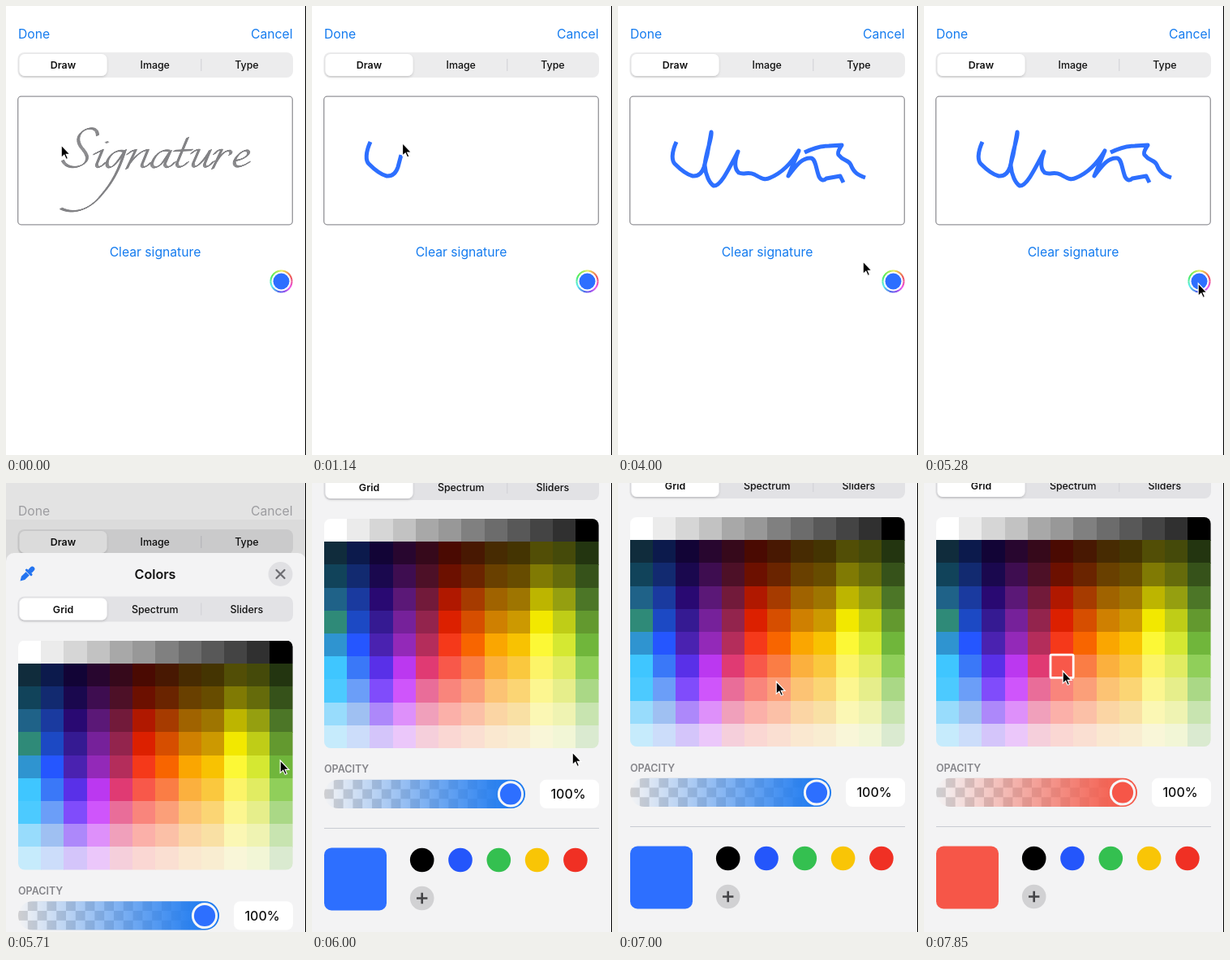
Animation, 370 px wide and 552 px high, one loop 8000 ms. Source, as an HTML page:

```html
<!DOCTYPE html>
<html lang="en">
<head>
<meta charset="utf-8">
<title>Signature pad</title>
<style>
html, body { margin: 0; width: 100%; height: 100%; overflow: hidden; background: #fff; }
svg { display: block; width: 370px; height: 552px; --c: #2d6fff; --track: #1f7bf0; }
svg.red { --c: #f65648; --track: #f45c4c; }
text { font-family: Inter, Roboto, sans-serif; fill: #111; }
.link { font-size: 15.7px; fill: #147bef; }
.dimmed .link { fill: #b0b0b4; }
.seg { font-size: 12.4px; font-weight: 500; text-anchor: middle; }
.on { font-weight: 600; }
.title { font-size: 16.1px; font-weight: 600; text-anchor: middle; }
.cap { font-size: 12.5px; font-weight: 600; fill: #85858a; }
.pct { font-size: 16px; font-weight: 500; text-anchor: middle; }
.ink { fill: none; stroke: #2d6fff; stroke-width: 5; stroke-linejoin: round; }
.tint { fill: var(--c); }
stop { stop-color: var(--track); }
</style>
</head>
<body>
<svg id="stage" viewBox="0 0 370 552">
  <defs>
    <pattern id="check" x="15" y="428.2" width="23.6" height="23.6" patternUnits="userSpaceOnUse">
      <rect width="23.6" height="23.6" fill="#f3f3f4"/>
      <path d="M11.8 0h11.8v11.8H0v11.8h11.8z" fill="#cfcfd1"/>
    </pattern>
    <linearGradient id="fade">
      <stop offset="0" stop-opacity="0"/><stop offset=".5" stop-opacity=".55"/><stop offset=".92"/>
    </linearGradient>
    <clipPath id="round"><rect x="15" y="107.5" width="338.6" height="282" rx="8"/></clipPath>
    <filter id="soft" x="-10%" y="-20%" width="120%" height="150%">
      <feDropShadow dx="0" dy="1.5" stdDeviation="1.8" flood-opacity=".16"/>
    </filter>
    <path id="word" d="M113 159C113 150 105 149 98 152C88 157 87 166 93 174C100 182 103 188 96 194C88 200 74 200 70 190
      M109 182L119 177L112 194C111 201 118 198 123 192M124 167l1 1
      M146 179C138 175 128 182 125 191C123 199 128 200 133 196C139 190 143 184 147 177C140 200 132 216 118 232C104 250 84 257 68 249
      M150 182Q155 177 160 177L149 200M152 194C160 184 168 177 175 177L168 194C166 201 174 198 179 192
      M201 178C190 175 182 186 180 194C180 202 190 198 195 190L203 178L196 194C196 201 204 198 208 192
      M224 162L211 193C210 201 219 198 224 192M208 178L229 177
      M229 181Q234 176 238 177L231 193C229 203 241 196 252 177L245 194C244 201 251 197 256 191
      M257 182Q261 176 266 177L255 200M259 192C264 184 270 177 276 178Q279 180 276 183
      M282 190C290 190 301 184 299 179C297 175 286 180 282 190C280 199 288 200 300 192"/>
  </defs>

  <g id="page">
    <rect width="370" height="552" fill="#fff"/>
    <text class="link" x="15" y="40">Done</text>
    <text class="link" x="353.5" y="40" text-anchor="end">Cancel</text>
    <g id="modes"></g>
    <rect x="14.7" y="111.2" width="338.6" height="157.6" rx="4" fill="#fff" stroke="#949499" stroke-width="1.3"/>
    <g id="hint" role="img" aria-label="Signature" fill="none" stroke="#828285" stroke-linecap="round"></g>
    <path id="inkA" class="ink" d="M72 167C66 180 66 190 70 194C76 200 84 207 92 209Q102 210 106 198L110 183L115 155
      C117 160 108 180 107 196C108 208 113 218 118 221C126 222 136 202 148 179C144 190 143 200 149 205
      C156 208 160 203 168 207C176 211 180 215 188 211C200 206 212 196 223 178L210 209
      C218 199 226 186 238 187C244 188 244 200 248 210Q252 217 257 212L274 209L278 217"/>
    <path id="inkB" class="ink" d="M230 180C240 175 252 172 260 172L276 171Q270 180 272 183C278 191 284 189 287 195C291 205 296 208 305 211"/>
    <text class="link" x="184" y="308.4" text-anchor="middle">Clear signature</text>
    <g id="well" fill="none" stroke-width="2.1"></g>
    <circle cx="339.5" cy="338.5" r="10" fill="#2d6fff"/>
  </g>

  <g id="dim">
    <rect width="370" height="552" fill-opacity=".145"/>
    <rect y="45" width="370" height="507" fill-opacity=".05"/>
  </g>

  <g id="sheet">
    <rect width="370" height="760" rx="10" fill="#f3f3f4"/>
    <g transform="translate(26 26) rotate(45)" fill="#2474f0">
      <rect x="-3" y="-12" width="6" height="9" rx="3"/>
      <rect x="-5.5" y="-4.6" width="11" height="3" rx="1.5"/>
      <path d="M-3 -1V7L0 12L3 7V-1z"/>
    </g>
    <text class="title" x="184" y="32">Colors</text>
    <circle cx="338.5" cy="26" r="15" fill="#e0e0e3"/>
    <path d="M333.5 21l10 10m0-10l-10 10" stroke="#6c6c71" stroke-width="2.2" stroke-linecap="round"/>
    <g id="tabs"></g>
    <g id="grid" clip-path="url(#round)" shape-rendering="crispEdges"></g>
    <rect id="pick" x="156" y="276.7" width="28.2" height="28.2" rx="1.5" fill="none" stroke="#fff" stroke-width="2.8"/>
    <text class="cap" x="15" y="420">OPACITY</text>
    <rect x="15" y="428.2" width="248" height="35.4" rx="17.7" fill="url(#check)"/>
    <rect x="15" y="428.2" width="248" height="35.4" rx="17.7" fill="url(#fade)"/>
    <circle class="tint" cx="245" cy="446" r="14.6" stroke="#f6f6f8" stroke-width="3"/>
    <rect x="281" y="428.2" width="73" height="35.4" rx="8" fill="#fff"/>
    <text class="pct" x="316" y="451.8">100%</text>
    <path d="M15 488H354" stroke="#c8cbd2"/>
    <rect class="tint" x="15" y="512" width="77" height="77" rx="9"/>
    <g id="dots"></g>
    <circle cx="135.7" cy="574" r="14.8" fill="#d1d1d3"/>
    <path d="M129 574h13.4m-6.7-6.7v13.4" stroke="#444447" stroke-width="2.6"/>
  </g>

  <path id="arrow" d="M0 0V15.4L3.6 12.2L6 17.4L8.3 16.4L6 11.4H10.8Z" fill="#000" stroke="#fff" stroke-width="1.1"/>
  <rect x="369" width="1" height="552"/>
</svg>

<script>
const $ = id => document.getElementById(id);
const LOOP = 8000, FPS = 7;

function add(parent, tag, attrs, text) {
  const el = document.createElementNS('http://www.w3.org/2000/svg', tag);
  for (const key in attrs) el.setAttribute(key, attrs[key]);
  if (text) el.textContent = text;
  parent.append(el);
  return el;
}

function segments(parent, y, track, labels) {
  add(parent, 'rect', { x: 14.5, y, width: 339.5, height: 31, rx: 8, fill: track });
  add(parent, 'rect', { x: 16.5, y: y + 2, width: 108, height: 27, rx: 6.5, fill: '#fff', filter: 'url(#soft)' });
  add(parent, 'rect', { x: 240.3, y: y + 8, width: 1, height: 15, fill: '#cfcfd4' });
  labels.forEach((label, i) =>
    add(parent, 'text', { class: i ? 'seg' : 'seg on', x: 70.5 + i * 113.2, y: y + 20 }, label));
}
segments($('modes'), 57, '#ececed', ['Draw', 'Image', 'Type']);
segments($('tabs'), 53.5, '#e2e2e5', ['Grid', 'Spectrum', 'Sliders']);

// broad-nib lettering: shifted copies of a thin line
for (let i = -3; i <= 3; i++)
  add($('hint'), 'use', { href: '#word', transform: `translate(${i * 0.5} ${-i * 0.24})` });

for (let a = 0; a < 360; a += 10) {
  const at = d => {
    const r = d * Math.PI / 180;
    return `${339.5 + 13 * Math.sin(r)} ${338.5 - 13 * Math.cos(r)}`;
  };
  add($('well'), 'path', { d: `M${at(a)}A13 13 0 0 1 ${at(a + 10.5)}`, stroke: `hsl(${(420 - a) % 360} 80% 62%)` });
}

const palette = [
  'ffffff ebebeb d6d6d6 c2c2c2 a8a8a8 989898 808080 6c6c6c 585858 444444 303030 000000',
  '102c3c 0c1a4c 120436 28062f 36091b 4a0a02 481802 472b02 443402 524e06 454a0a 233510',
  '11435a 122a70 1a084e 3e0d50 4d1027 6c1000 6a2400 694000 674c00 807a04 656b0b 36521a',
  '1f6288 1a3a9f 290972 5b1877 721a3a b01800 a63b00 a06300 9e7501 bdb500 959f10 4c7627',
  '2f8a78 1c49c4 351a92 76219a 93244d dc2000 d64e00 cf8001 cc9901 f2e800 bfcd17 63992f',
  '2f94d0 2556ff 4a22b0 9329b8 b42d5b f5391a f86500 faa601 f8c202 fcf836 d5e832 70b63b',
  '3fc6ff 3a78f8 5930e8 bb38f0 e03a73 f8584a fa7d45 fbb03e fac83e fcf468 e1ec62 90cf5a',
  '4ccaff 6b9ef8 804cfb cf55fb e96d99 f9857c fb9f79 fcc374 fbd574 fcf690 e6ee8b aad886',
  '98dcfc 9fc0f2 ad88fa de90fa f0a0bb fbb0a9 fbc0a7 fbd5a4 f9e0a4 fbf7b4 eff3b2 c8e4b0',
  'c6ebfc ccddfa d4c5fa ebc7fa f5cfdb fad7d3 fadfd2 fae8d0 f9edd1 f9f6d8 f2f6d6 daead0'
];
const CELL = 338.6 / 12;
palette.forEach((row, j) => row.split(' ').forEach((hex, i) =>
  add($('grid'), 'rect', { x: 15 + i * CELL, y: 107.5 + j * 28.2, width: CELL + 0.3, height: 28.5, fill: '#' + hex })));

['#000', '#2456fb', '#34c050', '#f9c506', '#f03024'].forEach((fill, i) =>
  add($('dots'), 'circle', { cx: 135.7 + i * 47.3, cy: 527, r: 14.8, fill }));

// rows of [step, ...values], linear in between
function lerp(rows, k) {
  const n = rows.findIndex(row => row[0] > k);
  if (n < 0) return rows[rows.length - 1].slice(1);
  if (n === 0) return rows[0].slice(1);
  const a = rows[n - 1], b = rows[n], u = (k - a[0]) / (b[0] - a[0]);
  return a.slice(1).map((v, i) => v + (b[i + 1] - v) * u);
}

const lenA = $('inkA').getTotalLength(), lenB = $('inkB').getTotalLength();
const drawA = [[3, 0], [8, 90], [20, lenA]];
const drawB = [[21, 0], [25, lenB]];
const moves = [
  [0, 69, 172], [3, 72, 168],
  [25, 305, 211], [28, 303, 315], [29, 303, 315], [34, 339, 342], [40, 339, 342],
  [42, 322, 332], [49, 196, 245], [50, 196, 245], [53, 172, 232]
];
const LEAD = 14;

function ink(path, length) {
  path.style.strokeDasharray = `${length} 9999`;
  path.style.visibility = length > 0 ? 'visible' : 'hidden';
}

function pointer(k, a, b) {
  if (k < 3 || k >= 25) return lerp(moves, k);
  const p = k < 21 ? $('inkA').getPointAtLength(Math.min(lenA, a + LEAD))
                   : $('inkB').getPointAtLength(Math.min(lenB, b + LEAD));
  return [p.x, p.y];
}

function render(ms) {
  const k = Math.floor((ms + 5) * FPS / 1000);
  const [a] = lerp(drawA, k), [b] = lerp(drawB, k);
  ink($('inkA'), a);
  ink($('inkB'), b);
  $('hint').style.visibility = k < 3 ? 'visible' : 'hidden';

  const [x, y] = pointer(k, a, b);
  $('arrow').setAttribute('transform', `translate(${x - 0.8} ${y - 1})`);

  // critically damped spring brings the sheet in
  const w = 18.26 * Math.max(0, k / FPS - 5.565);
  const rest = (1 + w) * Math.exp(-w);
  $('sheet').setAttribute('transform', `translate(0 ${-65.5 + 621 * rest})`);
  $('dim').style.opacity = 1 - rest;
  $('page').classList.toggle('dimmed', k >= 40);

  const picked = k >= 53;
  $('pick').style.visibility = picked ? 'visible' : 'hidden';
  $('stage').classList.toggle('red', picked);
}

const start = performance.now();
function tick() {
  render((performance.now() - start) % LOOP);
  requestAnimationFrame(tick);
}
tick();
</script>
</body>
</html>
```
